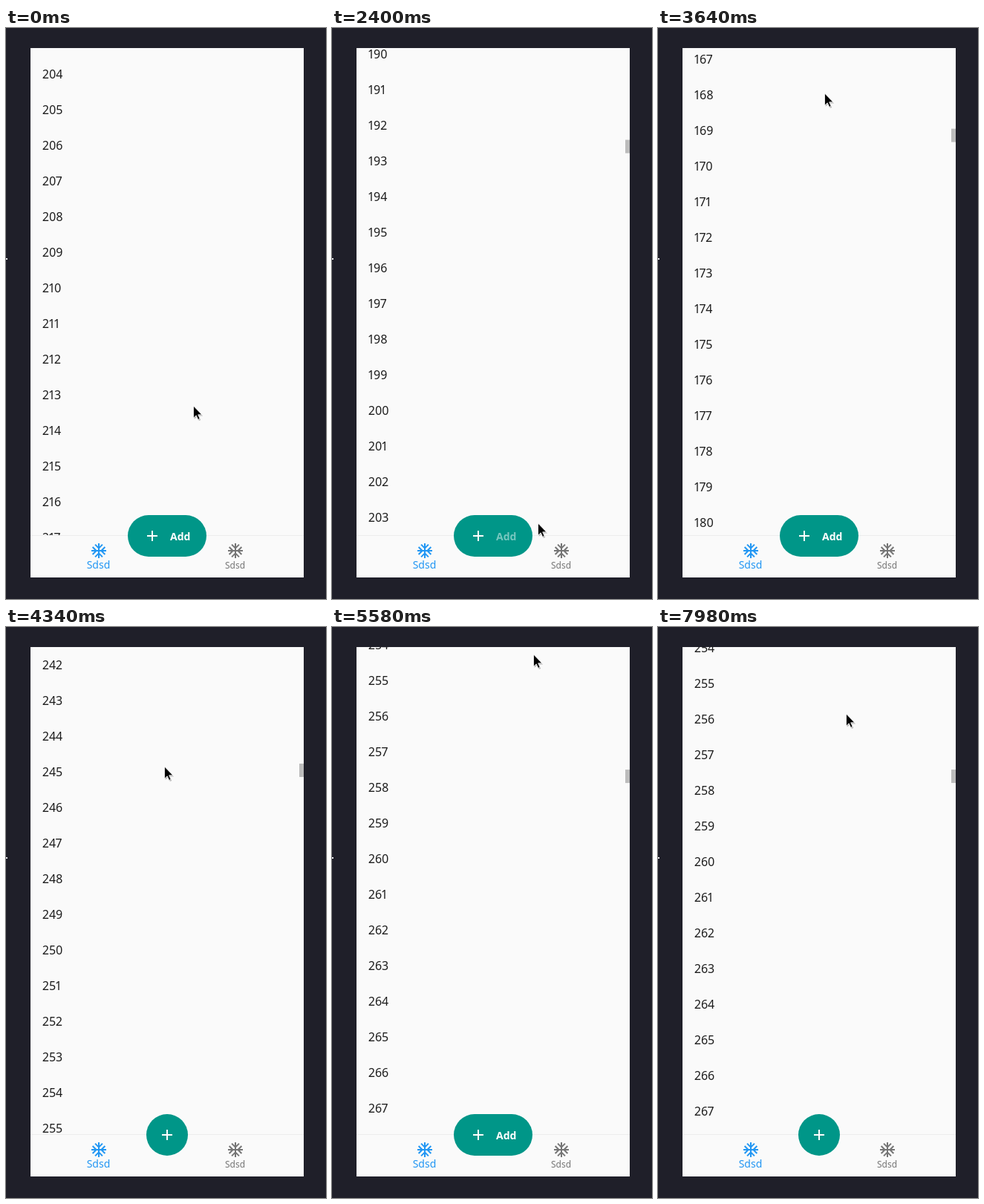
An HTML page for the animation above (8000 ms loop, 431 px wide and 769 px high).

```html
<!DOCTYPE html>
<html lang="en">
<head>
<meta charset="utf-8">
<title>Scrolling list</title>
<style>
  html, body { margin: 0; width: 100%; height: 100%; overflow: hidden; background: #1f1f29; }
  svg { display: block; width: 431px; height: 769px; }
  text { font-family: "Noto Sans", "Open Sans", sans-serif; font-weight: 300; font-variant-numeric: proportional-nums; }
  #rows { font-size: 16px; fill: #1c1c1c; }
  .tab { text-anchor: middle; }
  .icon { fill: none; stroke-width: 2; }
  #add { font-size: 14px; font-weight: 700; fill: #fff; }
</style>
</head>
<body>
<svg viewBox="0 0 431 769">
  <defs>
    <clipPath id="view"><rect x="33" y="27" width="368" height="656"/></clipPath>
    <clipPath id="pill"><rect id="pillShape" y="656" height="56" rx="28"/></clipPath>
    <path id="arm" d="M0 0V-10M-4.95 -8.36L0 -3.41L4.95 -8.36"/>
    <g id="flake">
      <use href="#arm"/>
      <use href="#arm" transform="rotate(90)"/>
      <use href="#arm" transform="rotate(180)"/>
      <use href="#arm" transform="rotate(270)"/>
    </g>
    <path id="arrow" d="M0 0V16.2L3.7 12.8L6.2 18.4L8.6 17.3L6.2 11.8H11.4Z"/>
  </defs>

  <rect width="431" height="769" fill="#1f1f29"/>
  <rect y="310" width="2" height="2" fill="#e4e4e6"/>
  <rect x="33" y="27" width="368" height="713" fill="#fafafa"/>
  <g clip-path="url(#view)">
    <g id="rows"></g>
    <rect id="thumb" x="395" width="6" height="18" fill="#bcbcbc"/>
  </g>

  <rect x="33" y="683" width="368" height="1" fill="#ececec"/>
  <use href="#flake" class="icon" x="125" y="704" stroke="#2196f3"/>
  <use href="#flake" class="icon" x="309" y="704" stroke="#757575"/>
  <text class="tab" x="124.5" y="728" font-size="14" fill="#2196f3">Sdsd</text>
  <text class="tab" x="308.5" y="728" font-size="12" fill="#757575">Sdsd</text>

  <rect id="fab" y="656" height="56" rx="28" fill="#009688"/>
  <g clip-path="url(#pill)">
    <path id="plus" d="M-7 0H7M0 -7V7" stroke="#fff" stroke-width="2"/>
    <text id="add" y="689.5">Add</text>
  </g>

  <g id="cursor">
    <use href="#arrow" x="1.2" y="1.6" opacity="0.25"/>
    <use href="#arrow" stroke="#fff" stroke-width="0.8" stroke-linejoin="round"/>
  </g>
</svg>
<script>
const LOOP = 8000, PITCH = 48, FAB_TIME = 500, START = 9730;
const $ = id => document.getElementById(id);
const set = (id, attrs) => {
  for (const name in attrs) $(id).setAttribute(name, attrs[name]);
};
const ramp = (t, from, to) => Math.max(0, Math.min(1, (t - from) / (to - from)));
const easeOut = u => 1 - (1 - u) ** 2;
const smooth = u => u * u * (3 - 2 * u);
const mix = (a, b, u) => a + (b - a) * u;

// Each swipe: start time, end time, scroll offset reached
let last = START;
const swipes = [
  [160, 900, 10180], [960, 1220, 10381], [1260, 1760, 10900], [1980, 2400, 9085],
  [2440, 3200, 8250], [3240, 3640, 7974], [3800, 4600, 11989], [4640, 4840, 12500],
  [4860, 5080, 12168], [6280, 7060, 11400], [7120, 7880, 12164]
].map(([start, end, to]) => {
  const from = last;
  last = to;
  return { start, end, from, to, forward: to > from };
});

// Turning points of the pointer: time, x, y
const turns = [
  [140, 253, 509], [460, 235, 110], [960, 232, 580], [1220, 221, 369], [1760, 235, 90],
  [1980, 240, 90], [2400, 278, 667], [2800, 240, 90], [3200, 250, 600], [3640, 225, 88],
  [3800, 235, 650], [4070, 222, 1], [4340, 214, 188], [4860, 225, 120], [5080, 270, 650],
  [5580, 272, 37], [6280, 264, 50], [6800, 268, 650], [7500, 254, 113], [7960, 254, 113],
  [7980, 254, 117]
];

const rows = Array.from({ length: 16 }, () => {
  const row = document.createElementNS("http://www.w3.org/2000/svg", "text");
  row.setAttribute("x", 49);
  return $("rows").appendChild(row);
});

function scrollAt(t) {
  const s = swipes.findLast(s => s.start <= t);
  return s ? mix(s.from, s.to, easeOut(ramp(t, s.start, s.end))) : START;
}

function drawList(t) {
  const offset = Math.round(scrollAt(t));
  const first = Math.ceil((offset + 10) / PITCH);
  rows.forEach((row, i) => {
    row.textContent = first + i;
    row.setAttribute("y", (first + i) * PITCH - offset + 6);
  });
  // The thumb appears with a swipe and fades after a pause
  const shown = swipes.map(s => Math.min(ramp(t, s.start, s.start + 100), 1 - ramp(t, s.end + 520, s.end + 780)));
  set("thumb", { y: 28.2 + offset * 0.01347, opacity: Math.max(...shown) });
}

// The button closes on forward swipes and opens on backward ones
function openness(t) {
  let open = 1;
  for (const s of swipes) {
    const p = ramp(t, s.start, s.start + FAB_TIME);
    open = s.forward ? Math.min(open, 1 - p) : Math.max(open, p);
  }
  return open;
}

function drawFab(t) {
  const open = openness(t), grow = easeOut(ramp(open, 0, 0.75));
  const width = mix(56, 106, grow), x = 217 - width / 2;
  set("fab", { x, width });
  set("pillShape", { x, width });
  set("plus", { transform: `translate(${x + mix(28, 33, grow)} 684)` });
  set("add", { x: x + 57, opacity: ramp(open, 0.7, 1) });
}

function drawCursor(t) {
  const i = Math.max(1, turns.findIndex(k => k[0] > t));
  const [a, b] = t < turns.at(-1)[0] ? [turns[i - 1], turns[i]] : [turns.at(-1), turns.at(-1)];
  const u = a === b ? 0 : smooth(ramp(t, a[0], b[0]));
  const x = Math.round(mix(a[1], b[1], u)), y = Math.round(mix(a[2], b[2], u));
  set("cursor", { transform: `translate(${x - 0.5} ${y})` });
}

function draw(now) {
  const t = now % LOOP;
  drawList(t);
  drawFab(t);
  drawCursor(t);
}

let begin;
function tick(now) {
  begin ??= now;
  draw(now - begin);
  requestAnimationFrame(tick);
}
draw(0);
requestAnimationFrame(tick);
</script>
</body>
</html>
```
